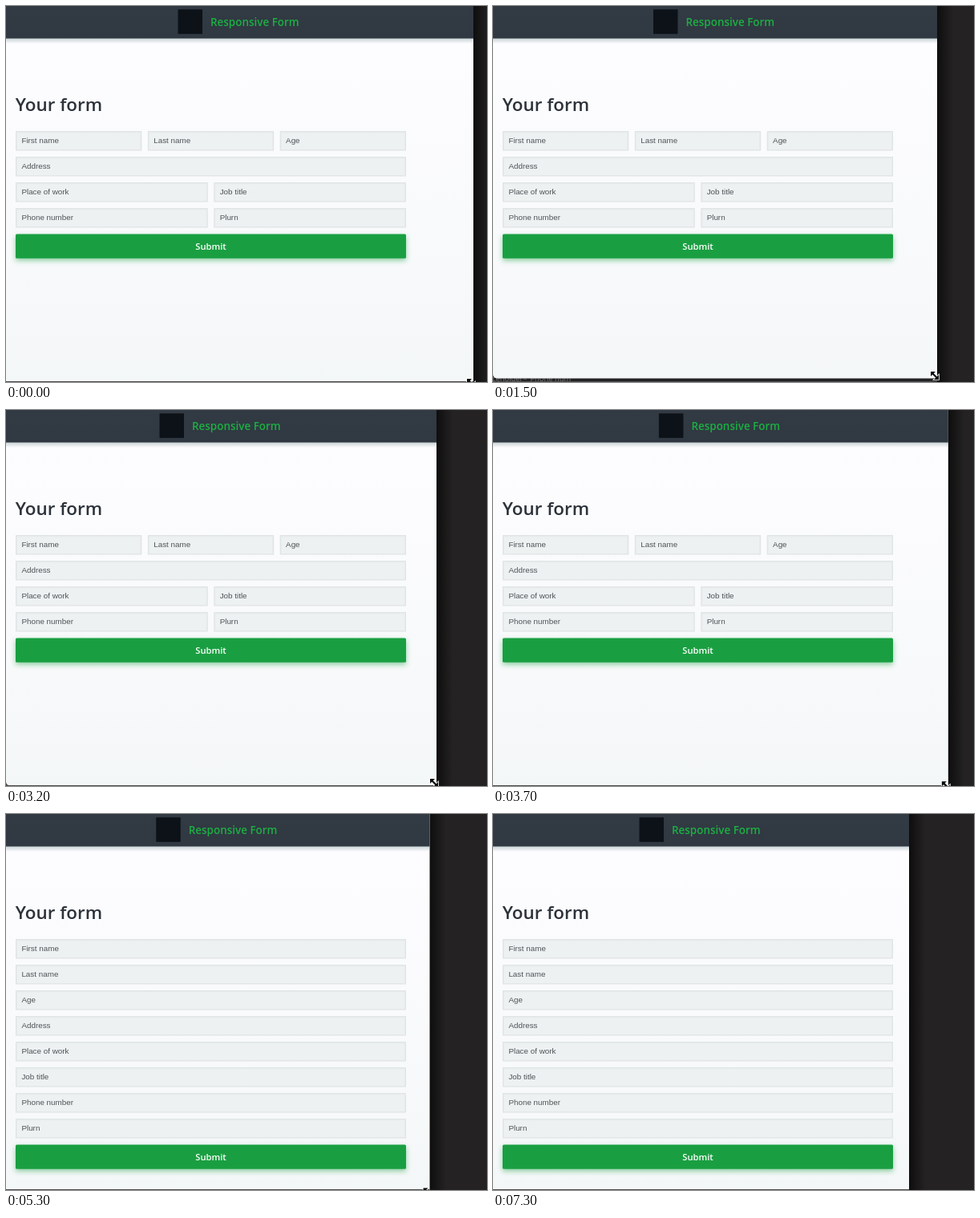
Animation, 600 px wide and 469 px high, one loop 7.5 s. Source, as an HTML page:

```html
<!DOCTYPE html>
<html lang="en">
<head>
<meta charset="utf-8">
<title>Responsive form</title>
<style>
  html, body { margin: 0; width: 100%; height: 100%; overflow: hidden; background: #242222; }
  svg { display: block; width: 600px; height: 469px; }
  text { white-space: pre; }
  .open { font-family: "Open Sans", "Noto Sans", sans-serif; font-weight: 600; }
  .label { font: 9.85px "Liberation Sans", Arial, sans-serif; fill: #505356; }
</style>
</head>
<body>
<svg viewBox="0 0 600 469">
  <defs>
    <linearGradient id="paper" gradientUnits="userSpaceOnUse" x1="0" y1="40" x2="0" y2="469">
      <stop offset="0" stop-color="#fdfdff"/>
      <stop offset=".5" stop-color="#f9fafb"/>
      <stop offset="1" stop-color="#f4f7f8"/>
    </linearGradient>
    <linearGradient id="bar" x1="0" y1="0" x2="0" y2="1">
      <stop offset="0" stop-color="#323a43"/>
      <stop offset="1" stop-color="#303842"/>
    </linearGradient>
    <linearGradient id="barShade" x1="0" y1="0" x2="0" y2="1">
      <stop offset="0" stop-color="#8fa3a8" stop-opacity=".5"/>
      <stop offset="1" stop-color="#8fa3a8" stop-opacity="0"/>
    </linearGradient>
    <linearGradient id="sideShade" x1="0" y1="0" x2="1" y2="0">
      <stop offset="0" stop-color="#000" stop-opacity=".6"/>
      <stop offset=".25" stop-color="#000" stop-opacity=".45"/>
      <stop offset="1" stop-color="#000" stop-opacity="0"/>
    </linearGradient>
    <filter id="glow" x="-5%" y="-50%" width="110%" height="220%">
      <feGaussianBlur stdDeviation="3.2"/>
    </filter>
  </defs>

  <rect width="600" height="469" fill="#242222"/>
  <text x="-1" y="467.5" font-family="Open Sans, sans-serif" font-size="9.4" fill="#77787a">ceholder="Phone num</text>
  <rect id="side" width="20" height="469" fill="url(#sideShade)"/>
  <rect id="page" y="-10" rx="5" fill="url(#paper)"/>
  <rect id="shade" y="40" height="7" fill="url(#barShade)"/>
  <rect id="head" height="40.5" fill="url(#bar)"/>
  <g id="brand">
    <rect x="214.5" y="4.3" width="30.5" height="30.5" fill="#0d1219"/>
    <text class="open" x="255" y="24.7" font-size="13.44" fill="#1bb042">Responsive Form</text>
  </g>
  <text class="open" x="11.7" y="131" font-size="22.4" fill="#2c323a">Your form</text>
  <g id="wide"></g>
  <g id="narrow"></g>
  <rect y="468" width="600" height="1" id="edge" fill="#4c4d4e"/>
  <path id="cursor" d="M-5-5H1L-1.2-2.8 2.8 1.2 5-1V5H-1L1.2 2.8-2.8-1.2-5 1Z"
        fill="#0c0c0c" stroke="#fff" stroke-width="1.6" paint-order="stroke"/>
</svg>
<script>
const LOOP = 7500, STEP = 100, BREAK = 532;
const LEFT = 12, FULL = 487, GAP = 7.5, TOP = 156, ROW = 32;
const $ = id => document.getElementById(id);

// time, window width, pointer height
const KEYS = [
  [0, 583, 470], [600, 583, 470], [1000, 575, 466], [1400, 558.5, 461.5],
  [1500, 554, 461], [2100, 525, 465], [2200, 521, 465], [2500, 515, 465],
  [2800, 516, 465], [3000, 522, 465], [3100, 528, 465], [3200, 537, 465],
  [3800, 574, 469], [4200, 582, 471], [4500, 581, 471.5], [4600, 573, 471.5],
  [5300, 528.5, 471.5], [5400, 523, 471.5], [5800, 515, 471.5],
  [6200, 519, 471.5], [7500, 519, 471.5]
];

const ROWS = [
  ["First name", "Last name", "Age"],
  ["Address"],
  ["Place of work", "Job title"],
  ["Phone number", "Plurn"]
];

const field = (name, x, y, w) => `
  <rect x="${x}" y="${y}" width="${w}" height="24.5" fill="#dfe4e5"/>
  <rect x="${x + 1}" y="${y + 1}" width="${w - 2}" height="22.5" fill="#e7ebec"/>
  <rect x="${x + 2}" y="${y + 2.2}" width="${w - 4}" height="20.8" fill="#edf1f2"/>
  <text class="label" x="${x + 7.4}" y="${y + 15.2}">${name}</text>`;

const button = y => `
  <rect x="${LEFT}" y="${y + 3}" width="${FULL}" height="30" fill="#199f41" opacity=".5" filter="url(#glow)"/>
  <rect x="${LEFT}" y="${y}" width="${FULL}" height="30.3" rx="1.5" fill="#199f41"/>
  <text class="open" x="${LEFT + FULL / 2}" y="${y + 19.6}" font-size="11.2" fill="#fff" text-anchor="middle">Submit</text>`;

const form = rows => rows.map((names, r) => {
  const w = (FULL - GAP * (names.length - 1)) / names.length;
  return names.map((name, c) => field(name, LEFT + c * (w + GAP), TOP + r * ROW, w)).join("");
}).join("") + button(TOP + rows.length * ROW + .4);

$("wide").innerHTML = form(ROWS);
$("narrow").innerHTML = form(ROWS.flat().map(name => [name]));

function pose(t) {
  const i = KEYS.findIndex(k => k[0] > t);
  const a = KEYS[i - 1], b = KEYS[i];
  const k = (t - a[0]) / (b[0] - a[0]);
  return [1, 2].map(n => a[n] + (b[n] - a[n]) * k);
}

function draw(t) {
  const [w, y] = pose(t);
  const away = Math.min(1, Math.max(0, (t - 6200) / 700));
  for (const id of ["page", "shade", "head", "edge"]) $(id).setAttribute("width", w);
  $("page").setAttribute("height", y + 13.5);
  $("side").setAttribute("x", w);
  $("brand").setAttribute("transform", `translate(${(w - 583) / 2} 0)`);
  $("wide").style.display = w >= BREAK ? "" : "none";
  $("narrow").style.display = w < BREAK ? "" : "none";
  $("cursor").setAttribute("transform", `translate(${w - 3 + 52 * away} ${y + 5 * away})`);
}

const start = performance.now();
function tick() {
  const t = (performance.now() - start) % LOOP;
  draw(Math.floor(t / STEP) * STEP);
  requestAnimationFrame(tick);
}
tick();
</script>
</body>
</html>
```
